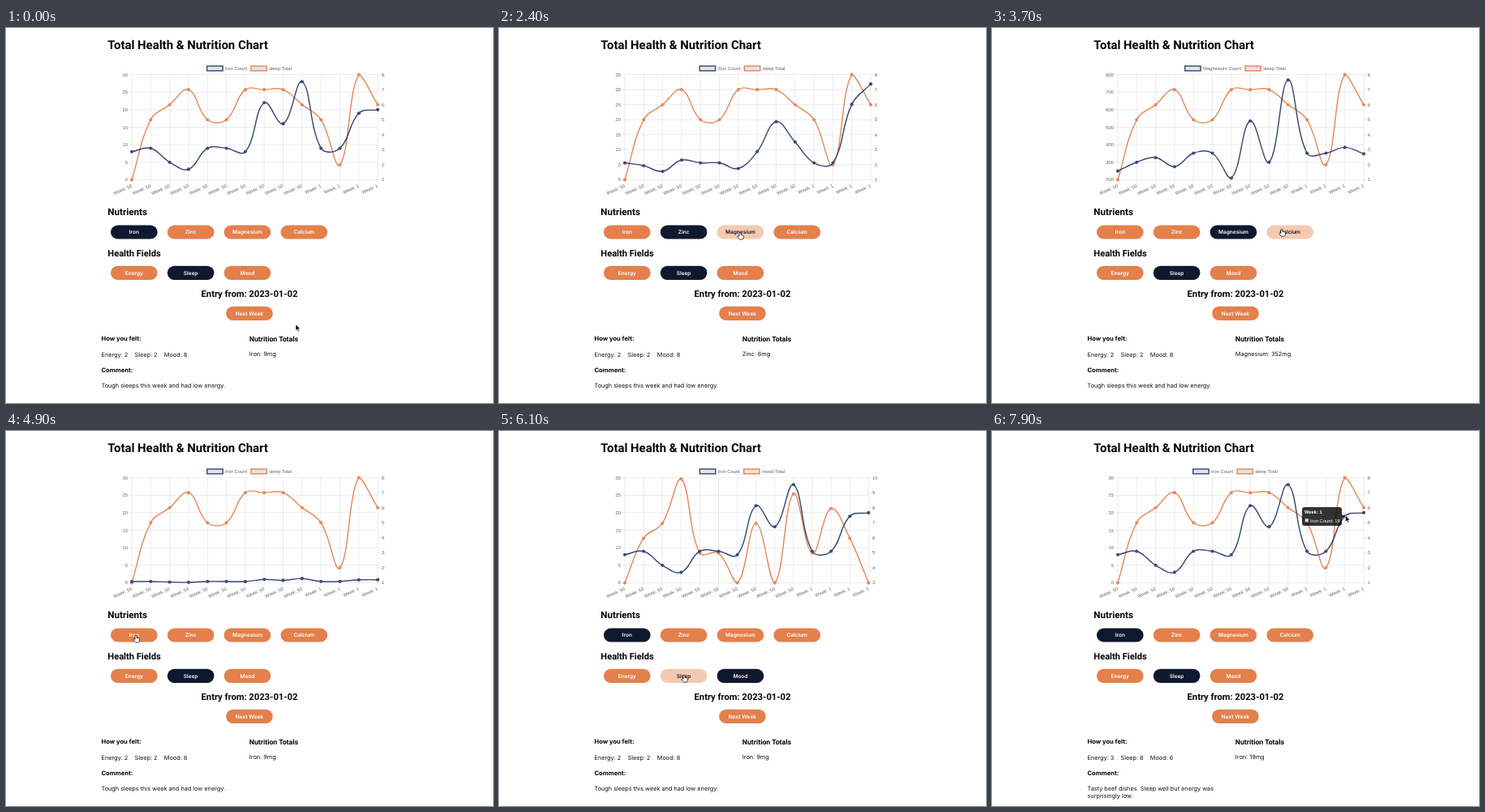
Animation of 600x463 px, one loop 8 s. Source, as an HTML page:

```html
<!DOCTYPE html>
<html lang="en">
<head>
<meta charset="utf-8">
<title>Total Health &amp; Nutrition Chart</title>
<style>
html, body { margin: 0; width: 100%; height: 100%; overflow: hidden; background: #fefefe; }
svg { display: block; width: 600px; height: 463px; text-rendering: geometricPrecision; }
.head { font-family: Roboto, sans-serif; font-weight: 700; fill: #060606; }
.body { font: 400 7.3px Inter, sans-serif; fill: #111; }
.strong { font: 700 7.6px Inter, sans-serif; fill: #060606; }
.btn { font: 600 6.5px Inter, sans-serif; text-anchor: middle; }
.chart { font: 5.8px "Liberation Sans", Arial, sans-serif; fill: #666; }
</style>
</head>
<body>
<svg viewBox="0 0 600 463" xmlns="http://www.w3.org/2000/svg">
  <g id="page"></g>
  <g id="axes" class="chart"></g>
  <g id="lines"></g>
  <g id="buttons"></g>
  <g id="entry" class="body"></g>
  <g id="tip" class="chart">
    <path d="M385 94H428Q431 94 431 97V103L434.5 105.5L431 108V114Q431 117 428 117H385Q382 117 382 114V97Q382 94 385 94Z" fill="#000" fill-opacity=".8"/>
    <text x="385" y="102.4" fill="#fff" font-weight="700">Week: 1</text>
    <rect x="385.4" y="108" width="4.6" height="4.6" fill="#d9dde8" stroke="#3a4a73" stroke-width=".6"/>
    <text x="392" y="112.5" fill="#fff">Iron Count: 19</text>
  </g>
  <g id="cursor" stroke-linejoin="round">
    <path id="arrow" d="M0 0V7.6L1.8 6L3 8.8L4.3 8.2L3.1 5.5L5.4 5.3Z" fill="#000" stroke="#fff" stroke-width=".5"/>
    <path id="hand" d="M-1 .8Q0-.6 1 .8V3.4Q4 3.1 4.4 4.9V7Q4 8.9 3 9.1H-.6Q-2.4 7.4-3.2 5.4Q-3 4-1 5.4Z" fill="#fff" stroke="#000" stroke-width=".7"/>
  </g>
</svg>
<script>
const LOOP = 8000, GROW = 1000;
const TOP = 57.6, BOTTOM = 187.4, LEFT = 155;
const BLUE = '#3a4a73', ORANGE = '#e48a5c';
const FILL = [227, 128, 76], PALE = [244, 201, 176], NAVY = [16, 24, 47], WHITE = [255, 255, 255];

const nutrients = {
  Iron: { axis: [0, 30, 5], total: '9mg', data: [8, 9, 5, 3, 9, 9, 8, 22, 16, 28, 9, 9, 19, 20] },
  Zinc: { axis: [0, 35, 5], total: '6mg', data: [6, 5, 3, 7, 6, 6, 4, 10, 20.6, 13.4, 6, 6, 26.8, 34] },
  Magnesium: { axis: [200, 800, 100], total: '352mg', data: [250, 300, 327, 275, 352, 352, 210, 536, 300, 770, 352, 352, 385, 348] },
  Calcium: { axis: [200, 1200, 200], total: '640mg', data: [520, 610, 480, 700, 640, 640, 430, 820, 560, 1010, 640, 640, 880, 760] }
};
const fields = {
  Sleep: { axis: [1, 8, 1], right: 458, data: [1, 5, 6, 7, 5, 5, 7, 7, 7, 6, 5, 2, 8, 6] },
  Mood: { axis: [3, 10, 1], right: 455.3, data: [3, 6, 7, 10, 5, 5, 3, 7, 3, 9, 5, 8, 6, 3] }
};

// Selections: [time, name]
const picks = [[-2000, 'Iron'], [1900, 'Zinc'], [2650, 'Magnesium'], [4150, 'Calcium'], [4890, 'Iron']];
const moods = [[-2000, 'Sleep'], [5431, 'Mood'], [6110, 'Sleep']];
const hovers = [['Zinc', 1600, 1900], ['Magnesium', 2220, 2650], ['Calcium', 3250, 4150], ['Iron', 4660, 4890], ['Sleep', 5940, 6110]];
const path = [
  [0, 357, 366], [100, 357, 366], [800, 338, 288], [1100, 316, 264], [1400, 288, 253], [1680, 232, 252], [2000, 230, 252],
  [2350, 297, 252], [2900, 297, 252], [3400, 357, 248], [4250, 357, 248], [4750, 160, 252],
  [4970, 160, 252], [5380, 280, 301], [5620, 280, 301], [6000, 228, 301], [6170, 228, 301],
  [6800, 418, 110], [7250, 431, 112], [7650, 435.5, 104.5], [8000, 435.5, 104.5]
];

const $ = id => document.getElementById(id);
const clamp = v => Math.max(0, Math.min(1, v));
const lerp = (a, b, k) => a + (b - a) * k;
const ease = ms => 1 - (1 - clamp(ms / GROW)) ** 4;
const rgb = (a, b, k) => `rgb(${a.map((v, i) => Math.round(lerp(v, b[i], k)))})`;
const latest = (list, t) => list.filter(e => e[0] <= t).pop();
const text = (x, y, s, attr = '') => `<text x="${x}" y="${y}" ${attr}>${s}</text>`;
const line = (x1, y1, x2, y2) => `<path d="M${x1} ${y1}L${x2} ${y2}"/>`;
const yOf = (v, [min, max]) => lerp(BOTTOM, TOP, (v - min) / (max - min));
const xOf = (i, right) => lerp(LEFT, right, i / 13);
const ticks = ([min, max, step]) => Array.from({ length: (max - min) / step + 1 }, (_, i) => min + i * step);

const pen = document.createElement('canvas').getContext('2d');
function widthOf(s) {
  pen.font = '58px "Liberation Sans", Arial, sans-serif';
  return pen.measureText(s).width / 10;
}

function setHTML(node, key, make) {
  if (node.dataset.key === key) return;
  node.dataset.key = key;
  node.innerHTML = make();
}

const head = (x, y, size, s, attr = '') => text(x, y, s, `class="head" font-size="${size}" ${attr}`);
$('page').innerHTML =
  head(125.3, 26.2, 14.9, 'Total Health &amp; Nutrition Chart') +
  head(125.3, 231.4, 11.6, 'Nutrients') +
  head(125.3, 281.8, 11.1, 'Health Fields') +
  head(300, 332, 11.2, 'Entry from: 2023-01-02', 'text-anchor="middle"') +
  head(299.8, 386.8, 8.7, 'Nutrition Totals') +
  text(117.5, 386.4, 'How you felt:', 'class="strong"') +
  text(117.5, 424.8, 'Comment:', 'class="strong"');

const buttons = [];
function addButton(name, x, y) {
  const g = document.createElementNS('http://www.w3.org/2000/svg', 'g');
  g.innerHTML = `<rect x="${x}" y="${y}" width="57.6" height="17.2" rx="8.6"/>` + text(x + 28.8, y + 11, name, 'class="btn"');
  $('buttons').append(g);
  buttons.push({ name, x, y, box: g.firstChild, label: g.lastChild });
}
Object.keys(nutrients).forEach((n, i) => addButton(n, 129 + i * 69.8, 243.4));
['Energy', 'Sleep', 'Mood'].forEach((n, i) => addButton(n, 129 + i * 69.8, 293.7));
addButton('Next Week', 271.1, 343.8);

function legend(labels) {
  const BOX = 19.4, GAP = 2.9, PAD = 4.85;
  const widths = labels.map(s => BOX + GAP + widthOf(s));
  let x = 299.8 - (widths[0] + widths[1] + PAD) / 2;
  return labels.map((s, i) => {
    const out = `<rect x="${x}" y="47" width="${BOX}" height="5.8" fill="#e3e3e3" stroke="${i ? ORANGE : BLUE}" stroke-width="1.45"/>` +
      text(x + BOX + GAP, 52, s);
    x += widths[i] + PAD;
    return out;
  }).join('');
}

function axes(pick, mood) {
  const n = nutrients[pick], f = fields[mood], r = f.right;
  let grid = '', out = '';
  for (const v of ticks(n.axis)) {
    const y = yOf(v, n.axis);
    grid += line(LEFT - 4, y, r, y);
    out += text(150, y + 2, v, 'text-anchor="end"');
  }
  for (const v of ticks(f.axis)) {
    const y = yOf(v, f.axis);
    grid += line(r, y, r + 4, y);
    out += text(r + 4.8, y + 2, v);
  }
  for (let i = 0; i < 14; i++) {
    const x = xOf(i, r);
    grid += line(x, TOP, x, BOTTOM + 4);
    out += `<text transform="translate(${x + .8} 196.3) rotate(-24)" text-anchor="end">Week: ${i < 10 ? 50 : 1}</text>`;
  }
  return `<g stroke="#000" stroke-opacity=".12" stroke-width=".6">${grid}</g>` + out +
    legend([pick + ' Count', mood.toLowerCase() + ' Total']);
}

// Cubic spline with tension, handles kept inside the plot
function curve(pts) {
  const T = .4, cap = y => Math.max(TOP, Math.min(BOTTOM, y));
  const handles = pts.map((p, i) => {
    const a = pts[i - 1] || p, b = pts[i + 1] || p;
    const da = Math.hypot(p[0] - a[0], p[1] - a[1]), db = Math.hypot(b[0] - p[0], b[1] - p[1]);
    const ka = T * da / (da + db), kb = T * db / (da + db);
    const dx = b[0] - a[0], dy = b[1] - a[1];
    return [p[0] - ka * dx, cap(p[1] - ka * dy), p[0] + kb * dx, cap(p[1] + kb * dy)];
  });
  return 'M' + pts[0] + pts.slice(1).map((p, i) =>
    `C${handles[i].slice(2)} ${handles[i + 1].slice(0, 2)} ${p}`).join('');
}

function series(set, right, grown, color) {
  const pts = set.data.map((v, i) => [xOf(i, right), lerp(BOTTOM, yOf(v, set.axis), grown)]);
  return `<path d="${curve(pts)}" fill="none" stroke="${color}" stroke-width="1.45"/>` +
    pts.map(p => `<circle cx="${p[0]}" cy="${p[1]}" r="2.05" fill="${color}"/>`).join('');
}

// Growth from the base line; later updates restart the easing from where it stands
function growth(start, others, t) {
  const starts = [start, ...others.map(e => e[0]).filter(s => s > start && s <= t)];
  return starts.reduce((v, s, i) => v + (1 - v) * ease((starts[i + 1] ?? t) - s), 0);
}

function blueRight(t) {
  return moods.reduce((x, [s, name], i) => {
    if (t < s) return x;
    const end = Math.min(t, moods[i + 1] ? moods[i + 1][0] : t);
    return lerp(x, fields[name].right, ease(end - s));
  }, fields.Sleep.right);
}

function cursorAt(t) {
  const i = path.findIndex(p => p[0] > t), a = path[i - 1], b = path[i];
  let k = (t - a[0]) / (b[0] - a[0]);
  k = k * k * (3 - 2 * k);
  return [lerp(a[1], b[1], k), lerp(a[2], b[2], k)];
}

function paintButtons(t, pick, mood) {
  const on = [pick, mood].filter(e => t >= e[0] + 120).map(e => e[1]);
  for (const b of buttons) {
    const h = hovers.find(e => e[0] === b.name && t >= e[1] && t < e[2]);
    const k = h ? clamp((t - h[1]) / 120) : 0;
    const active = on.includes(b.name);
    b.box.setAttribute('fill', active ? rgb(NAVY, NAVY, 0) : rgb(FILL, PALE, k));
    b.label.setAttribute('fill', active ? '#fff' : rgb(WHITE, NAVY, k));
  }
}

function entry(pick, picked) {
  const felt = picked ? [3, 8, 6] : [2, 2, 8];
  const note = picked ? ['Tasty beef dishes. Sleep well but energy was', 'surprisingly low.'] : ['Tough sleeps this week and had low energy.'];
  return text(117.5, 405.6, 'Energy: ' + felt[0]) + text(158.5, 405.6, 'Sleep: ' + felt[1]) + text(194.8, 405.6, 'Mood: ' + felt[2]) +
    note.map((s, i) => text(117.5, 444 + i * 9.2, s)).join('') +
    text(299.8, 404.6, `${pick}: ${picked ? '19mg' : nutrients[pick].total}`);
}

function draw(t) {
  const pick = latest(picks, t), mood = latest(moods, t);
  const n = nutrients[pick[1]], f = fields[mood[1]], picked = t >= 7800;
  setHTML($('axes'), pick[1] + mood[1], () => axes(pick[1], mood[1]));
  $('lines').innerHTML =
    series(f, f.right, growth(mood[0], picks, t), ORANGE) +
    series(n, blueRight(t), growth(pick[0], moods, t), BLUE);
  paintButtons(t, pick, mood);
  setHTML($('entry'), pick[1] + picked, () => entry(pick[1], picked));
  $('tip').setAttribute('opacity', clamp((t - 7680) / 200));

  const [x, y] = cursorAt(t);
  const over = buttons.some(b => x > b.x && x < b.x + 57.6 && y > b.y && y < b.y + 17.2);
  $('cursor').setAttribute('transform', `translate(${x} ${y})`);
  $('hand').style.display = over ? '' : 'none';
  $('arrow').style.display = over ? 'none' : '';
}

const began = performance.now();
function tick() {
  draw((performance.now() - began) % LOOP);
  requestAnimationFrame(tick);
}
tick();
</script>
</body>
</html>
```
